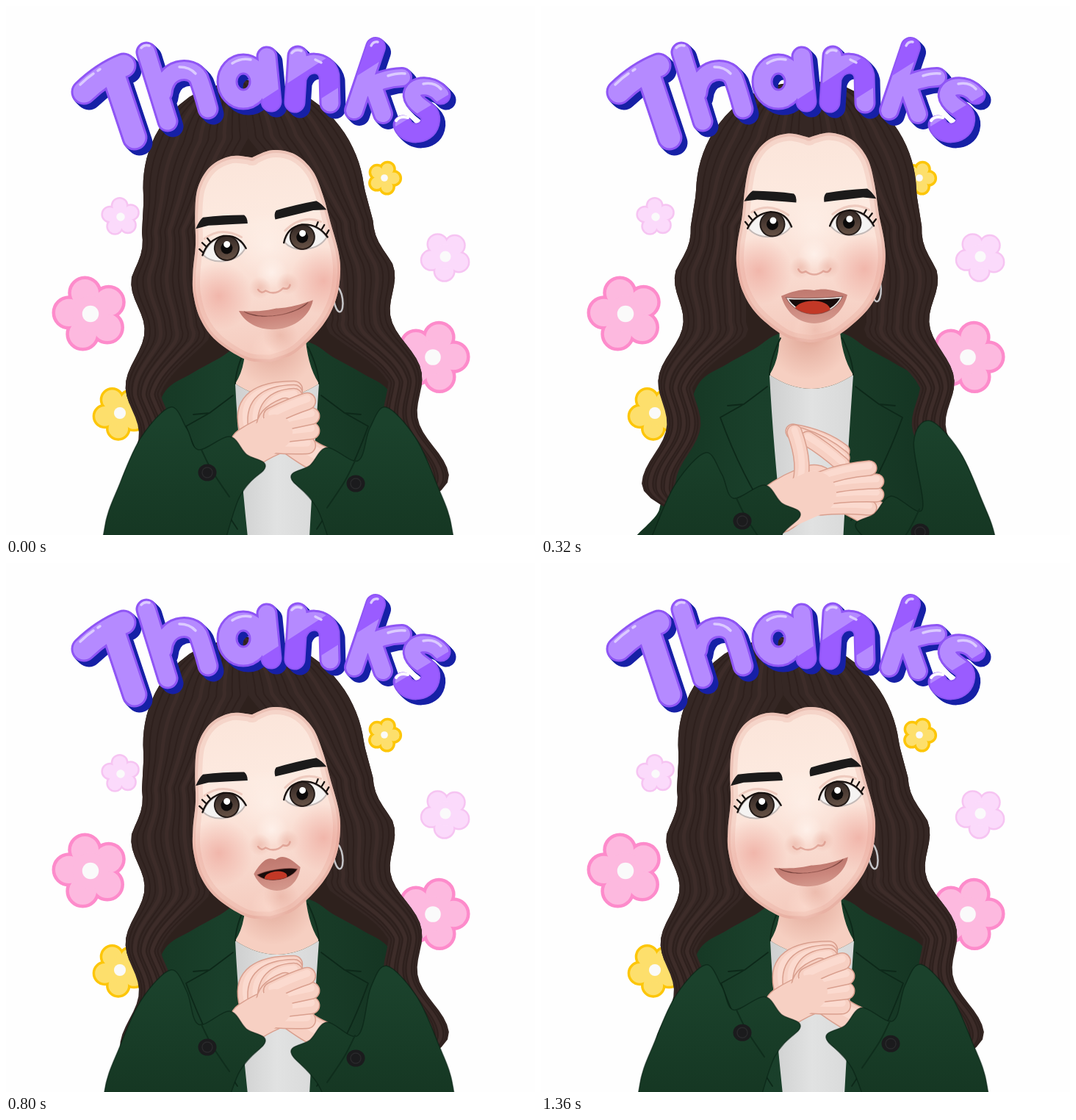
These frames come from a looping animation (720x720 px, 1440 ms). An HTML page with a canvas:

```html
<!DOCTYPE html>
<html lang="en">
<head>
<meta charset="utf-8">
<title>Thanks</title>
<style>
html, body { margin: 0; width: 100%; height: 100%; overflow: hidden; background: #fefefe; }
canvas { display: block; width: 720px; height: 720px; }
</style>
</head>
<body>
<canvas id="stage" width="720" height="720" role="img" aria-label="Thanks"></canvas>
<script>
const c = document.getElementById('stage').getContext('2d');
const STEP = 80, STEPS = 18;

// Head place and tilt, hair sway and lean, body shift, arm drops, hand clasp
const upright = { x: 381, y: 303, tilt: -.02, sway: 0, lean: 0, body: 0, dip: 0, arm: 200, drop: 230, clasp: 0 };
const asking = { ...upright, x: 367, y: 297, sway: -17, body: -11, arm: 62, drop: 66 };
const leaning = { x: 359, y: 309, tilt: -.107, sway: -8, lean: -26, body: -10, dip: 12, arm: 46, drop: 26, clasp: 1 };
const tilted = { ...leaning, x: 352, y: 323, tilt: -.145, sway: 2, lean: -42, arm: 8, drop: 24 };
// Mouth: half width, lip heights, sag of the opening, its height, lift of the corners
const talk = { wide: 46, up: 7, low: 24, sag: 2, gape: 3, lift: 0 };
const laugh = { wide: 45, up: 7, low: 39, sag: 3, gape: 22, lift: 3 };
const ooh = { wide: 32, up: 15, low: 28, sag: -2, gape: 14, lift: 3 };
const smile = { wide: 51, up: -4, low: 33, sag: 13, gape: 0, lift: 14 };

const keys = [
  [0, { ...tilted, ...smile, arm: 0, drop: 0 }],
  [1, { ...upright, ...talk }],
  [4, { ...asking, ...laugh }],
  [6, { ...leaning, ...laugh, low: 46 }],
  [10, { ...tilted, ...ooh }],
  [14, { ...tilted, ...smile, arm: 4, drop: 17 }],
  [18, { ...tilted, ...smile, arm: 0, drop: 0 }]
];

const lerp = (a, b, k) => a + (b - a) * k;
const clamp = v => Math.max(0, Math.min(1, v));
const pts = s => s.split(' ').map(p => p.split(',').map(Number));
const mirror = half => [...half, ...half.slice().reverse().map(([x, y]) => [-x, y])];
const sides = [1, -1];

function poseAt(step) {
  const i = keys.findIndex((k, n) => step < keys[n + 1][0]);
  const [[s0, a], [s1, b]] = [keys[i], keys[i + 1]], pose = {};
  for (const name in a) pose[name] = lerp(a[name], b[name], (step - s0) / (s1 - s0));
  return pose;
}

function curve(p, closed = true) {
  const path = new Path2D(), n = p.length;
  const get = i => closed ? p[(i + n) % n] : p[Math.max(0, Math.min(n - 1, i))];
  path.moveTo(...p[0]);
  for (let i = 0; i < (closed ? n : n - 1); i++) {
    const [a, b, d, e] = [get(i - 1), get(i), get(i + 1), get(i + 2)];
    path.bezierCurveTo(b[0] + (d[0] - a[0]) / 6, b[1] + (d[1] - a[1]) / 6,
      d[0] - (e[0] - b[0]) / 6, d[1] - (e[1] - b[1]) / 6, ...d);
  }
  if (closed) path.closePath();
  return path;
}
function poly(p) {
  const path = new Path2D();
  p.forEach(q => path.lineTo(...q));
  path.closePath();
  return path;
}
function oval(x, y, rx, ry = rx) {
  const path = new Path2D();
  path.ellipse(x, y, rx, ry, 0, 0, 7);
  return path;
}
function fill(path, color) { c.fillStyle = color; c.fill(path); }
function line(path, color, width) { c.strokeStyle = color; c.lineWidth = width; c.stroke(path); }
function inside(path, draw) { c.save(); c.clip(path); draw(); c.restore(); }
function placed(x, y, turn, draw) { c.save(); c.translate(x, y); c.rotate(turn); draw(); c.restore(); }
function ramp(x0, y0, x1, y1, ...colors) {
  const g = c.createLinearGradient(x0, y0, x1, y1);
  colors.forEach((v, i) => g.addColorStop(i / (colors.length - 1), v));
  return g;
}
function glow(x, y, r, rgb, alpha) {
  const g = c.createRadialGradient(x, y, 0, x, y, r);
  g.addColorStop(0, `rgba(${rgb},${alpha})`);
  g.addColorStop(1, `rgba(${rgb},0)`);
  fill(oval(x, y, r), g);
}

function flower(x, y, r, turn, color, edge, width) {
  const petals = [0, 1, 2, 3, 4].map(i => {
    const a = (turn + i * 72) * Math.PI / 180;
    return oval(x + Math.cos(a) * r * .6, y + Math.sin(a) * r * .6, r * .38);
  });
  petals.forEach(p => line(p, edge, width * 2));
  petals.forEach(p => fill(p, color));
  fill(oval(x, y, r * .5), color);
  fill(oval(x, y, r * .23), '#fafafa');
}
function flowers() {
  const pink = ['#fdb9df', '#fd8bcb', 4.5], pale = ['#fbdafb', '#f6c4f2', 2.5], gold = ['#fddf6c', '#fdc608', 3.5];
  flower(115, 419, 49, -105, ...pink);
  flower(581, 478, 47, -73, ...pink);
  flower(156, 287, 25, -95, ...pale);
  flower(598, 341, 33, -50, ...pale);
  flower(515, 234, 21, -70, ...gold);
  flower(155, 554, 35, -120, ...gold);
}

const letters = [
  [35, 'M106 117Q132 92 160 81M148 98L175 179'],
  [29, 'M191 63L220 157M213 118C216 84 252 80 262 98Q268 114 275 140'],
  [29, 'M345 103A22 24 0 1 1 301 103A22 24 0 1 1 345 103M355 69L361 130'],
  [29, 'M397 68L393 131M395 98C405 70 436 74 440 95L441 132'],
  [28, 'M503 56L474 142M490 112Q512 98 539 97M500 110L513 147'],
  [27, 'M592 121C578 103 548 108 554 125C560 140 582 140 577 159C572 178 545 176 540 162']
].map(([width, d]) => [width, new Path2D(d)]);
const stripes = new Path2D('M337 135L530 10V62L337 184ZM520 170L620 110V210H520Z');
const shine = new Path2D('M101 107Q110 98 119 92M125 88L128 86M184 57Q188 52 195 54M236 83Q250 83 258 92M308 78Q320 70 333 73M389 64Q394 58 402 61M421 73L429 77M497 54Q500 48 506 49M520 95Q533 91 543 92M568 106Q583 103 592 113');
function title() {
  for (const [width, p] of letters)
    for (let d = 1; d <= 7; d++) placed(d, d, 0, () => line(p, '#1620a6', width));
  for (const [width, p] of letters) {
    line(p, '#8f55f5', width);
    line(p, '#b58aff', width - 6);
    inside(stripes, () => line(p, '#9a5cff', width - 4));
  }
  line(shine, '#dccbff', 3.5);
  line(new Path2D('M531 156Q536 149 547 152'), '#fefefe', 4);
}

// Half width of the hair by height: a dome, then a widening wave that curls in at the tip
function outer(y) {
  if (y < 255) return 150 * Math.sqrt(1 - ((255 - y) / 155) ** 2);
  const wave = 11 * Math.cos((y - 365) / 280 * 4 * Math.PI) * clamp((y - 300) / 60);
  return 150 + (y - 255) * .16 + wave - 60 * Math.max(0, (y - 650) / 50) ** 2;
}
function inner(y) {
  if (y < 440) return 82 * clamp((y - 180) / 120);
  return outer(y) - 46 * Math.sqrt(clamp((702 - y) / 50)) - 44 * clamp((520 - y) / 70);
}
const heights = Array.from({ length: 61 }, (_, i) => 100 + i * 10);
function strand(pose, side, part, until = 700) {
  return heights.filter(y => y <= until).map(y => {
    const x = side * lerp(inner(y), outer(y), part);
    return [378 + x + pose.sway + pose.lean * (660 - y) / 400, y + pose.lean * x / 800];
  });
}
function backHair(pose) {
  fill(poly([...strand(pose, 1, 1, 530), ...strand(pose, -1, 1, 530).reverse()]), '#2e211d');
}
function locks(pose) {
  for (const side of sides) {
    const lock = poly([...strand(pose, side, 1), ...strand(pose, side, 0).reverse()]);
    fill(lock, '#352724');
    inside(lock, () => {
      for (let n = 1; n < 12; n++) {
        const dark = n % 3;
        line(curve(strand(pose, side, n / 12), false), dark ? 'rgba(30,18,16,.3)' : 'rgba(84,62,56,.25)', dark ? 2 : 5);
      }
    });
  }
}

const coat = curve(mirror(pts('37,444 78,467 116,488 152,512 170,560 190,620 207,685 222,760')));
const shirt = new Path2D('M-57 502Q0 540 57 502Q50 600 43 730H-38Q-52 600-57 502Z');
const throat = new Path2D('M-44 430Q-40 476-57 502Q0 540 57 502Q40 476 38 430Z');
const lapel = new Path2D('M42 452Q56 480 57 502M60 518L92 542L114 544M92 542L124 560Q95 640 54 700');
function torso(pose) {
  placed(379 + pose.body, pose.dip, 0, () => {
    fill(coat, ramp(-220, 0, 220, 0, '#143421', '#1a402b', '#183b27', '#12301f'));
    fill(shirt, ramp(-55, 0, 55, 0, '#cfd0d0', '#e1e2e2', '#d8d9d9'));
    fill(throat, '#f6cfc1');
    inside(throat, () => glow(-5, 450, 58, '205,130,112', .5));
    for (const side of sides) { c.save(); c.scale(side, 1); line(lapel, '#0d2819', 1.8); c.restore(); }
  });
}

const faceHalf = pts('0,-118 28,-124 58,-114 79,-88 88,-53 93,-13 100,25 101,55 93,90 73,122 36,152 8,160');
const eyeShape = new Path2D('M-30 4Q-20-16 2-18Q23-17 30 3Q20 17 0 17Q-20 17-30 4Z');
const lid = new Path2D('M-30 4Q-20-16 2-18Q23-17 30 3M-29 0L-33-5M-24-8L-28-13M-17-13L-20-18');
const brow = new Path2D('M-34-33Q-28-43-22-47Q8-46 34-42Q38-38 37-30Q4-33-16-35Z');
function eye(side) {
  c.save();
  c.translate(-56 * side, 0);
  c.scale(side, 1);
  line(new Path2D('M-24-18Q0-32 26-13'), 'rgba(215,155,140,.4)', 3);
  fill(eyeShape, '#f5f3f2');
  inside(eyeShape, () => {
    fill(oval(4, -1, 17.5), '#231b18');
    fill(oval(4, -1, 15.5), ramp(0, -16, 0, 18, '#362a26', '#6b5548'));
    fill(oval(4, -1, 8), '#0c0a0a');
    line(eyeShape, 'rgba(80,50,45,.3)', 4);
  });
  fill(oval(4 + side, -6, 4.5), '#fff');
  line(lid, '#17110f', 2.3);
  fill(brow, '#1b1a1a');
  c.restore();
}
function nose() {
  glow(0, -18, 22, '255,244,238', .8);
  for (const side of sides) glow(19 * side, 0, 15, '222,145,128', .35);
  line(new Path2D('M-22 2Q-19 9-12 5Q0 14 12 5Q19 9 22 2'), 'rgba(205,125,110,.5)', 2.5);
}
function mouth({ wide, up, low, sag, gape }) {
  const lips = new Path2D(`M${-wide} 0C${-wide / 2} ${-up * 1.3} ${-wide / 4} ${-up * 1.3} 0 ${-up}C${wide / 4} ${-up * 1.3} ${wide / 2} ${-up * 1.3} ${wide} 0C${wide * .7} ${low * 1.3} ${-wide * .7} ${low * 1.3} ${-wide} 0Z`);
  const w = wide * .86, bend = y => `${y * 1.33} ${-w * .6} ${y * 1.33} ${-w} 2`;
  const hole = new Path2D(`M${-w} 2C${-w / 2} ${sag * 1.33} ${w / 2} ${sag * 1.33} ${w} 2C${w * .6} ${bend(sag + gape)}Z`);
  glow(0, low + 8, 24, '215,140,122', .3);
  fill(lips, ramp(0, -up, 0, low, '#c07a70', '#cb877d', '#d59a8e'));
  fill(hole, '#180b0a');
  inside(hole, () => {
    if (gape > 16) line(hole, '#e9e6e4', 4);
    fill(oval(-3, sag + gape * .75, gape * 1.1, gape * .55), '#c23826');
  });
  line(hole, 'rgba(120,60,54,.5)', 1.2);
}
function head(pose) {
  placed(pose.x, pose.y, pose.tilt, () => {
    // The jaw stays over the neck while the brow tilts
    const outline = mirror(faceHalf).map(([x, y]) => [x + pose.tilt * 100 * Math.max(0, y) / 160, y]);
    const skin = curve(outline), chin = pose.tilt * 95;
    line(oval(88, 90, 6, 17), '#c5c5c8', 2.5);
    fill(skin, ramp(0, -120, 0, 160, '#fbe5da', '#fdeae0', '#f9dbd0', '#f4c9bc'));
    inside(skin, () => {
      line(skin, 'rgba(218,145,128,.2)', 20);
      line(skin, 'rgba(205,130,113,.22)', 8);
      for (const side of sides) glow(72 * side, 62, 46, '229,130,118', .42);
      glow(4, 4, 45, '255,244,237', .6);
      glow(chin, 144, 26, '255,226,214', .5);
    });
    sides.forEach(eye);
    placed(4, 59, 0, nose);
    placed(3, 100 - pose.lift, 0, () => mouth(pose));
  });
}

// A finger bends from an open line to a clasped one: start, bend, tip
function finger(open, clasp, k, width) {
  const [a, b, d] = open.map((p, i) => [lerp(p[0], clasp[i][0], k), lerp(p[1], clasp[i][1], k)]);
  const path = new Path2D(`M${a}Q${b} ${d}`);
  line(path, '#d99f8e', width + 2.5);
  line(path, '#f7d0c3', width - .5);
  placed(0, -width * .16, 0, () => line(path, 'rgba(255,230,220,.5)', width * .45));
}
function handPair({ drop, clasp }) {
  placed(0, drop, 0, () => {
    const size = lerp(19, 22, clasp);
    finger(pts('475,634 450,625 415,605'), pts('428,617 415,612 385,590'), clasp, 36);
    for (let i = 0; i < 3; i++)
      finger([[410, 540 + i * 9], [385, 520 + i * 8], [343 + i * 10, 513 + i * 5]],
        [[328 + i * 13, 572], [318 + i * 17, 522 + i * 6], [392, 522 + i * 5]], clasp, size);
    const palm = [pts('322,618 345,600 372,592'), pts('332,600 350,588 372,580')];
    finger(...palm, clasp, lerp(66, 54, clasp));
    finger(pts('350,590 362,560 345,514'), pts('352,575 352,556 380,545'), clasp, size);
    for (let i = 3; i >= 0; i--) {
      const arc = Math.sin(Math.PI * (i + .5) / 4);
      finger([[380, 578 + i * 13], [410, 566 + i * 16], [440 + 18 * arc, 563 + i * 18]],
        [[362, 558 + i * 13], [388, 545 + i * 18], [406 + 10 * arc, 538 + i * 20]], clasp, size);
    }
    const k = clasp;
    line(new Path2D(`M${lerp(325, 336, k)} ${lerp(618, 600, k)}L${lerp(372, 366, k)} ${lerp(597, 580, k)}`), '#f7d0c3', lerp(60, 48, k));
  });
}

const upperArm = pts('246,575 224,546 184,587 155,650 134,712 134,800 262,800');
const cuff = pts('318,668 353,627 327,610 304,586 262,604');
function sleeves({ arm, drop, clasp }) {
  for (const side of sides) {
    const right = side < 0, fall = right ? arm * .3 + (1 - clasp) * (drop - 66) : arm;
    const reach = right ? (1 - clasp) * 40 : 0, low = drop + (right ? 15 : 0);
    const flip = (x, out) => right ? 741 - x + out : x;
    const path = curve([...upperArm.map(([x, y]) => [flip(x, arm * .2), y + fall]),
      ...cuff.map(([x, y]) => [flip(x, reach), y + low])]);
    fill(path, ramp(0, 570, 0, 740, '#1b422c', '#153622'));
    line(path, 'rgba(8,32,19,.6)', 1.5);
    const at = p => p.map(([x, y]) => [flip(x, reach), y + low]);
    line(curve(at(pts('266,604 280,632 304,668')), false), '#0f2d1c', 2);
    const [[x, y]] = at([[right ? 265 : 274, 635]]);
    fill(oval(x, y, 12.5, 11.5), '#1b1b1d');
    line(oval(x, y, 7), '#29292b', 1.5);
  }
}

function draw(step) {
  const pose = poseAt(step);
  c.lineCap = c.lineJoin = 'round';
  c.fillStyle = '#fefefe';
  c.fillRect(0, 0, 720, 720);
  flowers();
  backHair(pose);
  torso(pose);
  locks(pose);
  head(pose);
  handPair(pose);
  sleeves(pose);
  title();
}

let shown = -1;
function tick() {
  const step = Math.floor(performance.now() / STEP) % STEPS;
  if (step !== shown) draw(shown = step);
  requestAnimationFrame(tick);
}
tick();
</script>
</body>
</html>
```
